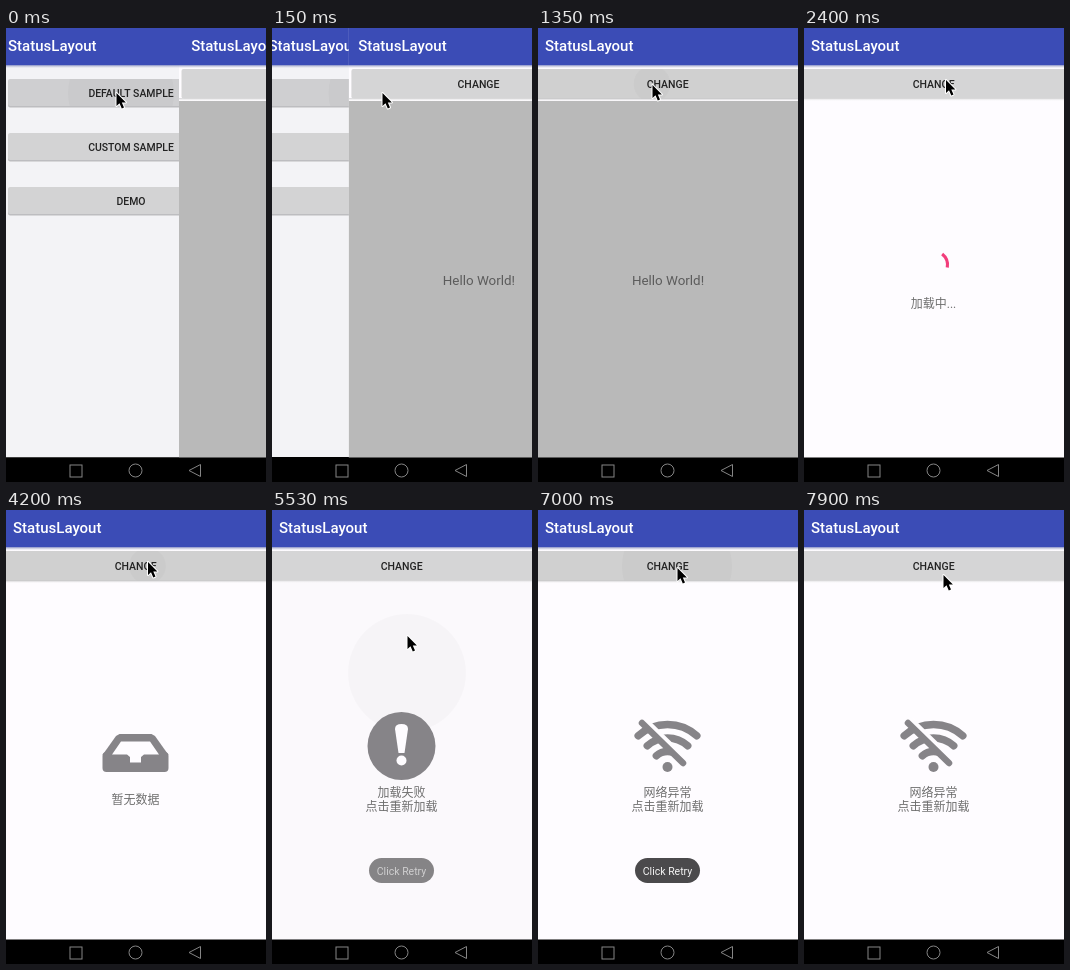
An HTML page with a canvas for the animation above (8000 ms loop, 260 px wide and 454 px high).

```html
<!DOCTYPE html>
<html lang="zh-CN">
<head>
<meta charset="utf-8">
<title>StatusLayout</title>
<style>
html, body { margin: 0; width: 100%; height: 100%; overflow: hidden; background: #fefcff; }
canvas { display: block; width: 100vw; height: 100vh; }
</style>
</head>
<body>
<canvas id="stage"></canvas>
<script>
const W = 260, H = 454, LOOP = 8000, BEAT = 150;
const canvas = document.getElementById('stage');
const ctx = canvas.getContext('2d');
const FONT = 'Roboto, "Noto Sans CJK SC", "Noto Sans CJK", sans-serif';
const BLUE = '#3b4cb6', PAGE = '#fefcff', ICON = '#868488', LABEL = '#6e6e6e';

// All times below are counted in beats.
const CLICKS = [9, 18, 28, 45];
const SCREENS = [hello, loading, empty, failed, offline];
const RETRY_TAP = 36;
const MOVES = [
  { end: 7, beats: 1, x: 114, y: 56 },
  { end: 15, beats: 3, x: 141.5, y: 51 },
  { end: 33, beats: 3, x: 135, y: 125 },
  { end: 43, beats: 4, x: 139, y: 57 },
  { end: 53, beats: 1, x: 139, y: 64 }
];

const clamp = v => Math.max(0, Math.min(1, v));
const smooth = v => { v = clamp(v); return v * v * (3 - 2 * v); };

// The beat shortens slightly in the second half of the loop.
function beatAt(t) {
  return Math.floor((t + 50 * clamp((t - 4500) / 1900)) / BEAT);
}

function rect(x, y, w, h, color) {
  ctx.fillStyle = color;
  ctx.fillRect(x, y, w, h);
}

function round(x, y, w, h, r, color) {
  ctx.fillStyle = color;
  ctx.beginPath();
  ctx.roundRect(x, y, w, h, r);
  ctx.fill();
}

function disc(x, y, r, color) {
  ctx.fillStyle = color;
  ctx.beginPath();
  ctx.arc(x, y, r, 0, Math.PI * 2);
  ctx.fill();
}

function ring(x, y, r, from = 0, to = Math.PI * 2) {
  ctx.beginPath();
  ctx.arc(x, y, r, from, to);
  ctx.stroke();
}

function trace(points) {
  ctx.beginPath();
  points.forEach(([x, y]) => ctx.lineTo(x, y));
  ctx.closePath();
}

function poly(points, color) {
  ctx.fillStyle = color;
  trace(points);
  ctx.fill();
}

// Completes half of a shape with its mirror image about x = 129.5.
function mirrored(half) {
  return [...half, ...half.map(([x, y]) => [259 - x, y]).reverse()];
}

function line(x1, y1, x2, y2, width, color) {
  ctx.strokeStyle = color;
  ctx.lineWidth = width;
  ctx.beginPath();
  ctx.moveTo(x1, y1);
  ctx.lineTo(x2, y2);
  ctx.stroke();
}

function fadeDown(y, h, color) {
  const shade = ctx.createLinearGradient(0, y, 0, y + h);
  shade.addColorStop(0, color);
  shade.addColorStop(1, 'rgba(255,255,255,0)');
  rect(0, y, W, h, shade);
}

function text(str, x, y, size, color, weight = 400, align = 'center') {
  ctx.font = `${weight} ${size}px ${FONT}`;
  ctx.textAlign = align;
  ctx.fillStyle = color;
  ctx.fillText(str, x, y);
}

function ripple(x, y, r, box, alpha) {
  ctx.save();
  ctx.beginPath();
  ctx.rect(...box);
  ctx.clip();
  disc(x, y, r, `rgba(0,0,0,${alpha})`);
  ctx.restore();
}

function appBar(titleX) {
  rect(0, 0, W, 37.5, BLUE);
  fadeDown(37.5, 3.5, '#a3a8c8');
  text('StatusLayout', titleX, 22.5, 15, '#fff', 500, 'left');
}

function menuPage() {
  rect(0, 0, W, 429, '#f3f3f6');
  appBar(7);
  ['DEFAULT SAMPLE', 'CUSTOM SAMPLE', 'DEMO'].forEach((label, i) => {
    const y = 51 + 54 * i;
    round(7, y + 1, 246, 27.5, 2, '#bdbdc0');
    round(7, y, 246, 27, 2, i ? '#d3d3d4' : '#cfcfd1');
    if (!i) ripple(120, 65, 53, [7, y, 246, 27], .022);
    text(label, 130, y + 17.8, 10.45, '#222', 500);
  });
}

function hello() {
  rect(0, 73, W, 357, '#b9b9b9');
  text('Hello World!', 130, 256.5, 13.4, '#5c5c5c');
}

function loading(beat) {
  const since = (beat - 16) * BEAT;
  const cycles = since / 1333 + .85;
  const lap = Math.floor(cycles), p = cycles - lap;
  const spin = since / 2200 - .722 + lap * .75;
  const head = spin + .75 * smooth(p * 2);
  const tail = spin + .75 * smooth(p * 2 - 1) - .01;
  ctx.strokeStyle = '#f23d7b';
  ctx.lineWidth = 3.2;
  ctx.lineCap = 'butt';
  ring(129.5, 237, 14, tail * Math.PI * 2, head * Math.PI * 2);
  text('加载中...', 129.5, 280, 12, LABEL);
}

function empty() {
  poly(mirrored([[96.5, 245], [110, 226], [113.5, 224]]), ICON);
  round(96.5, 242, 66, 20, 4, ICON);
  poly(mirrored([[115, 231.5], [106, 244.5], [121, 244.5], [124, 247], [124, 252.5]]), PAGE);
  text('暂无数据', 129.5, 293.5, 12, LABEL);
}

function retryText(label) {
  text(label, 129.5, 286.5, 12, LABEL);
  text('点击重新加载', 129.5, 300.5, 12, LABEL);
}

function failed(beat) {
  const age = beat - RETRY_TAP;
  if (age >= 0) {
    const fade = clamp((4 - age) / 2);
    const box = [0, 71, W, 359];
    rect(...box, `rgba(0,0,0,${.01 * fade})`);
    ripple(135, 125 + age * 38, 25 + age * 34, box, .018 * fade);
  }
  disc(129.5, 236, 34, ICON);
  ctx.fillStyle = PAGE;
  ctx.beginPath();
  ctx.moveTo(123, 219);
  ctx.quadraticCurveTo(123, 214, 129.5, 214);
  ctx.quadraticCurveTo(136, 214, 136, 219);
  ctx.lineTo(132.5, 243);
  ctx.lineTo(126.5, 243);
  ctx.fill();
  disc(129.5, 250.5, 5, PAGE);
  retryText('加载失败');
}

function offline() {
  ctx.lineCap = 'round';
  ctx.lineWidth = 7.5;
  ctx.strokeStyle = ICON;
  for (const r of [43.5, 30, 16.5]) ring(129.5, 258, r, -Math.PI * .735, -Math.PI * .265);
  disc(129.5, 257, 5, ICON);
  line(107, 211, 148, 251, 7, PAGE);
  line(104, 213, 145, 253, 6.5, ICON);
  retryText('网络异常');
}

function changeButton(beat, x) {
  const click = CLICKS.filter(c => c <= beat).pop();
  const age = beat - click;
  const pressed = age < 5;
  fadeDown(70, 3.5, pressed ? '#b4b4b6' : '#d0d0d2');
  round(x, 41, W, 29.5, x ? 2 : 0, pressed ? '#d0d0d0' : '#d5d5d6');
  if (pressed) ripple(cursorAt(beat).x, 56, 55 * clamp((age + 1) / 3), [0, 41, W, 29.5], .022);
  text('CHANGE', 129.6, 59.6, 10.5, '#222', 500);
}

function samplePage(beat, off) {
  rect(0, 0, W, 430, PAGE);
  SCREENS[CLICKS.filter(c => c < beat).length](beat);
  appBar(7 + off * .03);
  changeButton(beat, off ? 2.5 : 0);
}

function toast(beat) {
  ctx.globalAlpha = Math.min(clamp((beat - RETRY_TAP + 1) / 3), clamp((52 - beat) / 3));
  round(97, 348, 65, 25, 12.5, '#4b4a4c');
  text('Click Retry', 129.5, 364.6, 10.5, '#f4f4f4');
  ctx.globalAlpha = 1;
}

function navBar() {
  rect(0, 429.5, W, 24.5, '#000');
  ctx.strokeStyle = '#858585';
  ctx.lineWidth = 1;
  ctx.lineCap = 'butt';
  ctx.strokeRect(64, 437, 12, 12);
  ring(129.5, 442.5, 6.5);
  trace([[183, 442.5], [194.5, 436.5], [194.5, 448.5]]);
  ctx.stroke();
}

function cursorAt(beat) {
  return MOVES.reduce((p, m) => {
    const k = smooth((beat - m.end + m.beats) / m.beats);
    return { x: p.x + (m.x - p.x) * k, y: p.y + (m.y - p.y) * k };
  }, { x: 110, y: 64 });
}

function cursor({ x, y }) {
  ctx.save();
  ctx.translate(x - .5, y - .5);
  ctx.lineJoin = 'round';
  ctx.strokeStyle = '#fff';
  ctx.lineWidth = 2;
  trace([[1, 1.5], [1, 14.5], [4, 11.8], [6.3, 17], [8.5, 16], [6.3, 11], [10.4, 11]]);
  ctx.stroke();
  ctx.fillStyle = '#000';
  ctx.fill();
  ctx.restore();
}

function shifted(dx, paint) {
  ctx.save();
  ctx.translate(dx, 0);
  paint();
  ctx.restore();
}

function draw(t) {
  const beat = beatAt(t % LOOP);
  const ratio = window.devicePixelRatio || 1;
  const w = Math.round(innerWidth * ratio), h = Math.round(innerHeight * ratio);
  if (canvas.width !== w || canvas.height !== h) {
    canvas.width = w;
    canvas.height = h;
  }
  ctx.setTransform(w / W, 0, 0, h / H, 0, 0);

  const off = 173 * (1 - clamp(beat / 3)) ** 2;
  if (off) shifted((off - W) * .057, menuPage);
  shifted(off, () => samplePage(beat, off));
  toast(beat);
  navBar();
  cursor(cursorAt(beat));
}

const start = performance.now();
function tick() {
  draw(performance.now() - start);
  requestAnimationFrame(tick);
}
tick();
</script>
</body>
</html>
```
